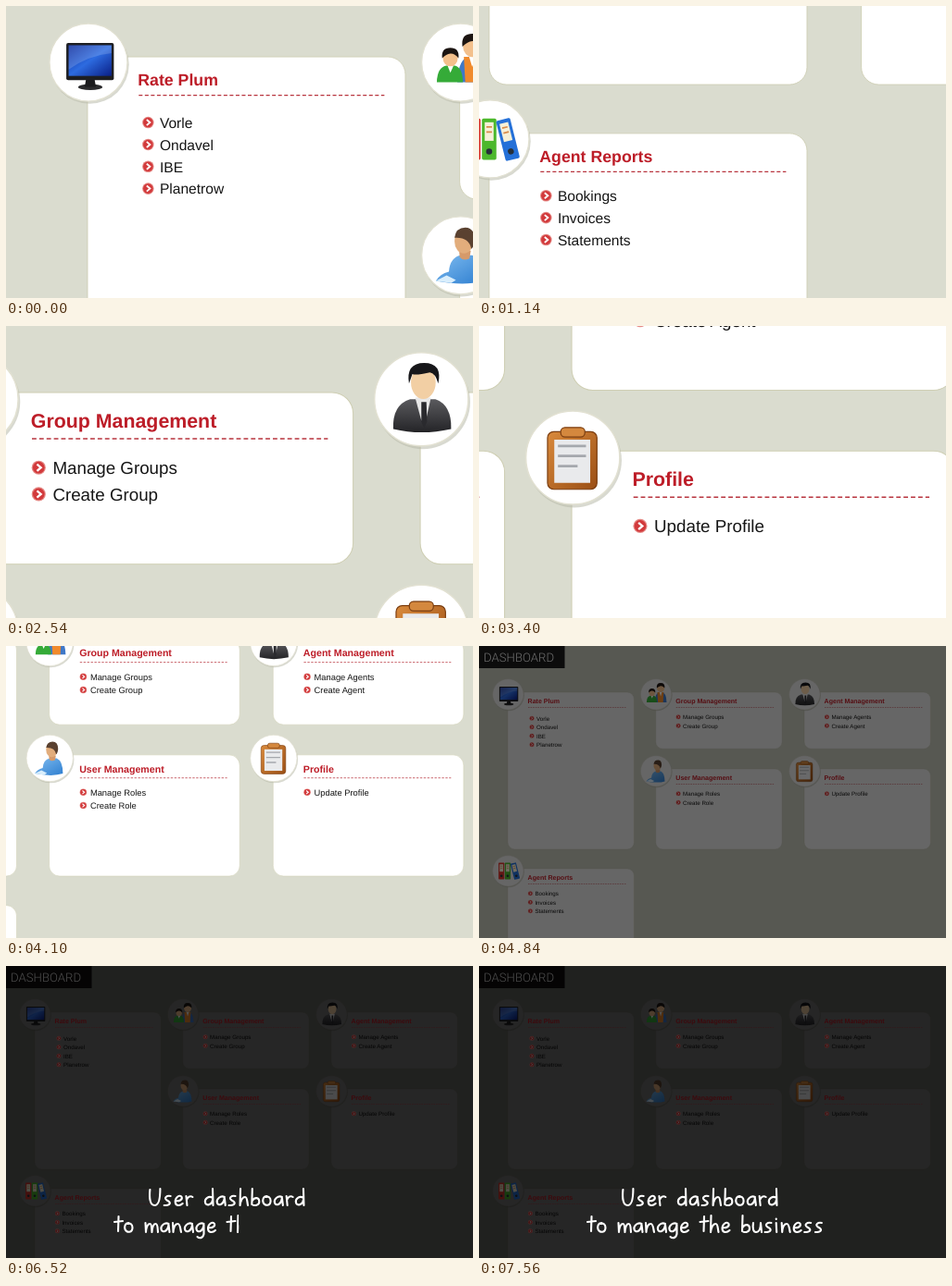
An HTML page for the animation above (8.1 s loop, 504 px wide and 316 px high).

```html
<!DOCTYPE html>
<html lang="en">
<head>
<meta charset="utf-8">
<title>Dashboard tour</title>
<style>
  html, body { margin: 0; width: 100%; height: 100%; overflow: hidden; background: #dadccf; }
  svg { display: block; width: 100vw; height: 100vh; }
  text { font-family: "Liberation Sans", Arial, sans-serif; text-rendering: geometricPrecision; }
  .head { font-size: 7.05px; font-weight: 700; fill: #bd1d28; }
  .item { font-size: 6.2px; fill: #161616; }
  .brand { font-family: Roboto, "Open Sans", sans-serif; font-size: 13.2px; font-weight: 300; fill: #f4f4f4; }
  .pen { fill: none; stroke: #fff; stroke-width: 2.1; stroke-linecap: round; stroke-linejoin: round; }
</style>
</head>
<body>
<svg viewBox="0 0 504 316">
  <defs>
    <linearGradient id="screen" x2="1" y2="1">
      <stop offset="0" stop-color="#0a2a9c"/><stop offset=".5" stop-color="#2d6be0"/><stop offset="1" stop-color="#0a1f86"/>
    </linearGradient>
    <linearGradient id="suit" x2="0" y2="1">
      <stop offset="0" stop-color="#5a5a5e"/><stop offset="1" stop-color="#242427"/>
    </linearGradient>
    <linearGradient id="blue" x2="1" y2="1">
      <stop offset="0" stop-color="#7fbcf0"/><stop offset="1" stop-color="#2f7fd0"/>
    </linearGradient>
    <linearGradient id="wood" x2="1" y2="1">
      <stop offset="0" stop-color="#d98a3c"/><stop offset="1" stop-color="#9a4e14"/>
    </linearGradient>
    <g id="bullet">
      <circle r="2.5" fill="#e58a86"/><circle r="2.1" fill="#d23a3c"/>
      <path d="M-.6-1.2L.8 0L-.6 1.2" fill="none" stroke="#fff" stroke-width=".75"/>
    </g>
    <g id="monitor">
      <ellipse cx=".8" cy="10.6" rx="5.2" ry="1.3" fill="#2a2a2c"/>
      <path d="M-1 7H2.6L3.2 10.5H-1.6Z" fill="#1b1b1d"/>
      <rect x="-9.5" y="-8.4" width="20.4" height="16" rx=".8" fill="#1d1e22"/>
      <rect x="-8.5" y="-7.4" width="18.4" height="13.2" fill="url(#screen)"/>
      <path d="M-8.5-7.4H9.9V-4Q0-3-8.5 3Z" fill="#fff" opacity=".16"/>
    </g>
    <g id="group">
      <path d="M-1.4 8.5Q-1-2 4-2.6H6Q11-2 11.4 8.5Z" fill="#3f78c8"/>
      <path d="M1.4-2.4H8.2L7.6 8.5H2Z" fill="#f08a2c"/>
      <path d="M3.6-2.6H6.4L5 2Z" fill="#fff"/>
      <ellipse cx="5" cy="-7" rx="4" ry="4.7" fill="#f3c08c"/>
      <path d="M.8-6.8Q0-12.4 5-12.4T9.2-6.8Q7-9.4 5-9.2T.8-6.8Z" fill="#1c1512"/>
      <path d="M-10.2 8.5Q-10 2-6 1.4H-2.6Q.8 2 1 8.5Z" fill="#35ab38"/>
      <path d="M-5.6 1.4H-3L-4.4 4.4Z" fill="#fff"/>
      <ellipse cx="-4.4" cy="-2" rx="3.2" ry="3.7" fill="#f3c08c"/>
      <path d="M-7.9-1.8Q-8.4-6.3-4.4-6.3T-.9-1.8Q-2.6-4-4.4-3.8T-7.9-1.8Z" fill="#1c1512"/>
    </g>
    <g id="user">
      <path d="M-10.6 11Q-9 8-5 7Q-4.6 1 0 0H5Q9.4 2 9.4 11Q2 13.4-10.6 11Z" fill="url(#blue)"/>
      <path d="M-10.6 11L-6 8.6L-2 10.6L-4 11.9Z" fill="#d9eefc"/>
      <path d="M-.6-2H4.4L3.8 1.4Q1 2.6-.4.8Z" fill="#d69a6a"/>
      <ellipse cx="1.4" cy="-6" rx="4" ry="5.2" fill="#e2ad7c"/>
      <path d="M-2.6-7.6Q-2-12 2-12T6-6.6Q5.6-3.4 4.6-2.8Q3.6-8-2.6-7.6Z" fill="#5a4130"/>
    </g>
    <g id="agent">
      <path d="M-10 10.6Q-10.4 2-4 0H5Q10.8 2 10.6 10.6Q0 13-10 10.6Z" fill="url(#suit)"/>
      <path d="M-2.2-.6H3.4L1.6 7.6H0Z" fill="#e8e8e8"/>
      <path d="M0 1H1.8L2 8L1 10.4L0 8Z" fill="#2a2a2e"/>
      <ellipse cx=".7" cy="-6" rx="4.4" ry="5.9" fill="#f2cfa4"/>
      <path d="M-4.4-5.6Q-5.6-13 1-13T6-5.6Q5-9.4 3-9.6Q-2-8.4-3.2-9Z" fill="#17171a"/>
    </g>
    <g id="board">
      <rect x="-9" y="-9.3" width="17.6" height="20.6" rx="2.2" fill="url(#wood)" stroke="#7c3f12" stroke-width=".4"/>
      <path d="M-6.6-6.4H6.2V9H-6.6Z" fill="#e9eaec"/>
      <path d="M-5-4.2H5M-5-.6H5M-5 3H2" transform="translate(-.3 0)" stroke="#a5a8ad" stroke-width=".9"/>
      <rect x="-4.3" y="-10.8" width="8.6" height="3.4" rx="1.5" fill="#d4883e" stroke="#7c3f12" stroke-width=".4"/>
    </g>
    <g id="binder">
      <rect x="-3.1" y="-8.8" width="6.2" height="17.8" rx=".7"/>
      <rect x="-1.9" y="-7.2" width="3.8" height="8" fill="#f5f0d8"/>
      <path d="M-1.2-5.2H1.2M-1.2-3H1.2" stroke="#d98c4a" stroke-width=".7"/>
      <circle cy="5.4" r="1.3" fill="#26303a"/>
    </g>
    <g id="binders">
      <use href="#binder" x="-7.2" fill="#d8342c"/>
      <use href="#binder" x="-.4" fill="#4cb82c"/>
      <use href="#binder" transform="translate(7.6 .1) rotate(-14)" fill="#2470d8"/>
    </g>
    <clipPath id="clip0"><rect x="152" y="236" height="29"/></clipPath>
    <clipPath id="clip1"><rect x="115" y="265" height="32"/></clipPath>
  </defs>
  <rect width="504" height="316" fill="#dadccf"/>
  <g id="page"></g>
  <rect id="shade" width="504" height="316" opacity="0"/>
  <g id="marks"></g>
  <g id="caption"></g>
</svg>
<script>
const $ = id => document.getElementById(id);

// x, y, height, icon, title, items, list shift
const cards = [
  [31, 50, 170, "monitor", "Rate Plum", ["Vorle", "Ondavel", "IBE", "Planetrow"], 1.6],
  [190.7, 50, 61.3, "group", "Group Management", ["Manage Groups", "Create Group"], 0],
  [351, 50, 61.3, "agent", "Agent Management", ["Manage Agents", "Create Agent"], 0],
  [190.7, 133, 87, "user", "User Management", ["Manage Roles", "Create Role"], 0],
  [351, 133, 87, "board", "Profile", ["Update Profile"], 0],
  [31, 241, 170, "binders", "Agent Reports", ["Bookings", "Invoices", "Statements"], 0]
];

let page = '<rect width="92.5" height="24" fill="#1f1d1e"/>';
let marks = '<text class="brand" x="5" y="17">DASHBOARD</text>';
for (const [x, y, h, icon, title, items, shift] of cards) {
  const cx = x + .4, cy = y + 2.4;
  page += `<rect x="${x}" y="${y}" width="136.4" height="${h}" rx="7.5" fill="#fff" stroke="#cfcfb4" stroke-width=".35"/>
    <circle cx="${cx + .5}" cy="${cy + .9}" r="16.9" fill="#b9baa9" opacity=".55"/>
    <circle cx="${cx}" cy="${cy}" r="16.7" fill="#fff" stroke="#e2e1d2" stroke-width=".5"/>`;
  marks += `<use href="#${icon}" x="${cx}" y="${cy}"/>
    <text class="head" x="${x + 21.6}" y="${y + 12.4}">${title}</text>
    <path d="M${x + 22} ${y + 16.5}h105.4" stroke="#b8343e" stroke-width=".5" stroke-dasharray="1.6 1"/>`;
  items.forEach((label, i) => {
    const row = y + 26.8 + shift * .9 + i * 9.48;
    page += `<text class="item" x="${x + 29.4 + shift}" y="${row + 2.3}">${label}</text>`;
    marks += `<use href="#bullet" x="${x + 24.4 + shift}" y="${row}"/>`;
  });
}
$("page").innerHTML = page;
$("marks").innerHTML = marks;

// Handwritten letters: advance, stroke
const pen = {
  U: [15, "M1-17C0-8 1 0 6 0C11 0 12-8 12-18"],
  s: [11.7, "M8-10C4-11 0-8 4-5.5C9-3 8 0 1 0"],
  e: [11.5, "M1-5C5-4 9-6 8-9C6-12 1-9 1-4C1 1 6 1 9-2"],
  r: [10, "M1-10L2 0M1.5-6C3-9 5-11 8-9"],
  d: [12.5, "M9-8C5-11 0-7 1-3C2 1 8 0 9-6M9-18L9.5 0"],
  a: [12.5, "M9-9C5-11 0-7 1-3C2 1 8 0 9-8L10 0"],
  h: [12.5, "M1.5-18L1 0C2-6 4-9 6.5-9C9-9 8.5-4 9.5 0"],
  b: [12, "M1.5-18L1-1C4 1 9 0 9-4C9-9 4-9 1.5-5"],
  o: [12, "M5-10C1-10 0-6 1-3C3 1 9 1 9-5C9-9 6-10 4-9"],
  t: [10.5, "M4.5-17L4-1M0-11L9-12"],
  m: [17, "M1-10L1.5 0C2-6 4-9 6-9C8-9 7.5-4 8 0C8.5-6 10-9 12-9C14.5-9 14-4 14.5 0"],
  n: [13, "M1-10L1.5 0C2-6 4-9 6.5-9C9-9 9-4 10 0"],
  g: [12.5, "M9-9C5-11 0-7 1-3C2 1 8 0 9-8L9 2C8 7 4 7 2 5"],
  u: [12.5, "M1-10C0-4 1 0 4 0C7 0 9-4 9-10L10 0"],
  i: [6.5, "M1.5-10L2 0M1.5-14.5L1.6-14"]
};
const lines = [
  { text: "User dashboard", x: 154.4, y: 259, gap: .28, span: 173 },
  { text: "to manage the business", x: 117, y: 288, gap: 0, span: 259 }
];
$("caption").innerHTML = lines.map(({ text, x, y, gap }, i) => {
  let out = "";
  for (const c of text) {
    const [step, d] = pen[c] || [10, ""];
    if (d) out += `<path class="pen" d="${d}" transform="translate(${x} ${y})"/>`;
    x += step + gap;
  }
  return `<g role="img" aria-label="${text}" clip-path="url(#clip${i})">${out}</g>`;
}).join("");
const wipes = lines.map((_, i) => $("clip" + i).firstElementChild);

// Camera stops: start of the move, scale, x, y
const stops = [
  [0, 2.515, 10, -70.7],
  [300, 2.515, 25, -537],
  [1060, 2.515, -343, -262],
  [1760, 3.03, -500.8, -79.5],
  [2460, 3.03, -963.5, -79.5],
  [3160, 3.03, -963.5, -330.5],
  [3860, 1, 0, 0]
];
const LOOP = 8100, TICK = 80, DIM = 4680, END = 7560;
const clamp = (v, lo = 0, hi = 1) => Math.min(hi, Math.max(lo, v));
const ease = f => (1 - Math.cos(Math.PI * f)) / 2;
const ticks = (t, from) => t < from ? 0 : Math.floor((t - from) / TICK) + 1;

function draw(t) {
  let cam = stops[0];
  for (const stop of stops.slice(1)) {
    const f = ease(clamp(ticks(t, stop[0]) / 6));
    cam = cam.map((v, i) => v + (stop[i] - v) * f);
  }
  const [, scale, x, y] = cam;
  const move = `translate(${x} ${y}) scale(${scale})`;
  $("page").setAttribute("transform", move);
  $("marks").setAttribute("transform", move);

  // Coloured marks darken with the page but stay a little brighter
  const n = ticks(t, DIM), dim = clamp(n / 4.25);
  $("shade").setAttribute("opacity", .85 * dim);
  $("marks").style.filter = n ? `brightness(${Math.max(.32, 1 - .78 * dim)})` : "none";

  const now = Math.min(END, DIM + (n - 1) * TICK);
  const u = clamp((now - 5380) / 2180);
  let left = (1 - (1 - u) ** 1.7) * (lines[0].span + lines[1].span);
  lines.forEach(({ span }, i) => {
    wipes[i].setAttribute("width", clamp(left, 0, span));
    left -= span;
  });
}

const start = performance.now();
function frame() {
  draw((performance.now() - start) % LOOP);
  requestAnimationFrame(frame);
}
frame();
</script>
</body>
</html>
```
